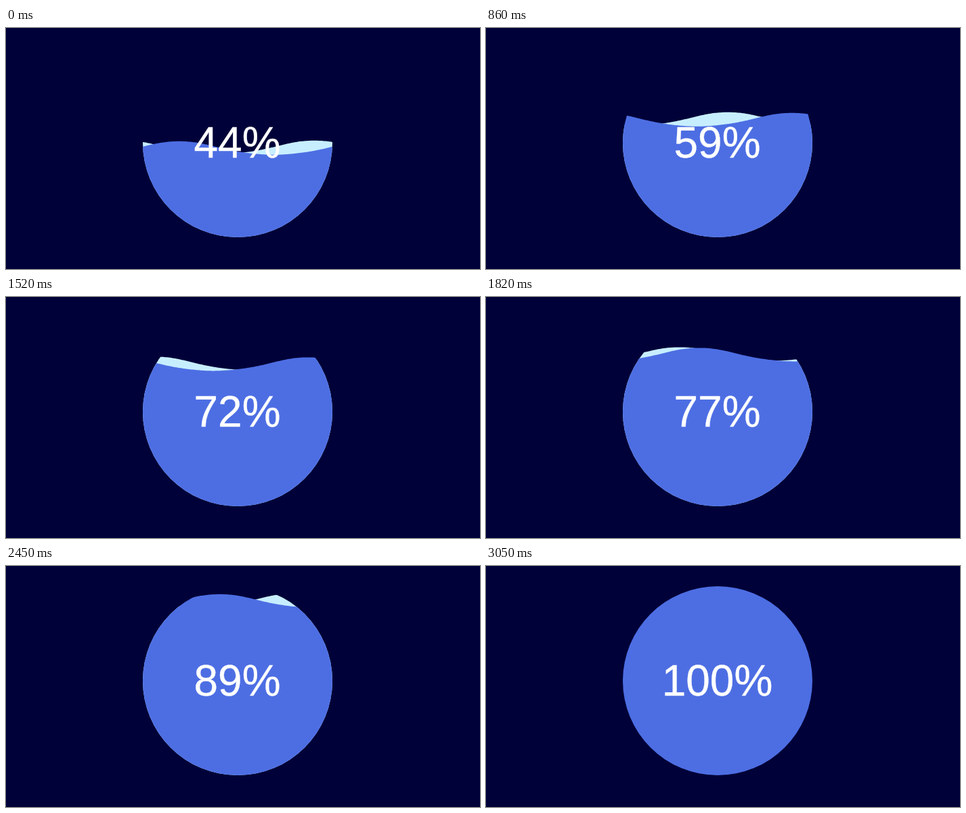
An HTML page with a canvas that plays this animation: 700x357 px, repeating every 3340 ms.

```html
<!DOCTYPE html>
<html lang="en">
<head>
<meta charset="utf-8">
<title>Water fill</title>
<style>
  html, body { margin: 0; width: 100%; height: 100%; overflow: hidden; background: #000138; }
  canvas { position: absolute; left: 0; top: 0; }
  #label {
    position: absolute; left: 0; top: 134px; width: 683px;
    font: 64px/72px "Liberation Sans", Arial, sans-serif;
    -webkit-text-stroke: 0.4px #fff;
    text-align: center; color: #fff;
  }
</style>
</head>
<body>
<canvas id="stage" width="700" height="357"></canvas>
<div id="label">44%</div>
<script>
const LOOP = 3340;
const CX = 342, CY = 170, R = 140;
const LEFT = CX - R, RIGHT = CX + R, BOTTOM = CY + R;
const PERIOD = 280, HEIGHT = 20;
const FRONT = "#4d6ee3", BACK = "#c7eeff";

const ctx = document.getElementById("stage").getContext("2d");
const label = document.getElementById("label");

// Depth below the crest: a cosine with narrow crests and wide troughs
function depth(x) {
  const d = ((x % PERIOD) + PERIOD) % PERIOD;
  const u = Math.min(d, PERIOD - d) / (PERIOD / 2);
  const phase = u + 0.06 * Math.sin(Math.PI * u) ** 2;
  return HEIGHT / 2 * (1 - Math.cos(Math.PI * phase));
}

function water(crestX, level, color) {
  ctx.beginPath();
  ctx.moveTo(LEFT, BOTTOM);
  for (let x = LEFT; x <= RIGHT; x += 2) {
    ctx.lineTo(x, level - HEIGHT + depth(x - crestX));
  }
  ctx.lineTo(RIGHT, BOTTOM);
  ctx.fillStyle = color;
  ctx.fill();
}

function draw(t) {
  const percent = Math.min(100, 44 + Math.floor(t / 54.5 + 0.2));
  const level = BOTTOM - 2 * R * percent / 100;
  const shift = 0.418 * t + 6e-6 * t * t;

  ctx.clearRect(0, 0, 700, 357);
  if (percent < 100) {
    ctx.save();
    ctx.beginPath();
    ctx.arc(CX, CY, R, 0, 2 * Math.PI);
    ctx.clip();
    water(455 + shift / 2, level, BACK);
    water(256 - shift, level + 1, FRONT);
    ctx.restore();
  } else {
    ctx.beginPath();
    ctx.arc(CX, CY, R, 0, 2 * Math.PI);
    ctx.fillStyle = FRONT;
    ctx.fill();
  }

  const text = percent + "%";
  if (label.textContent !== text) label.textContent = text;
}

const start = performance.now();
function tick() {
  draw((performance.now() - start) % LOOP);
  requestAnimationFrame(tick);
}
tick();
</script>
</body>
</html>
```
